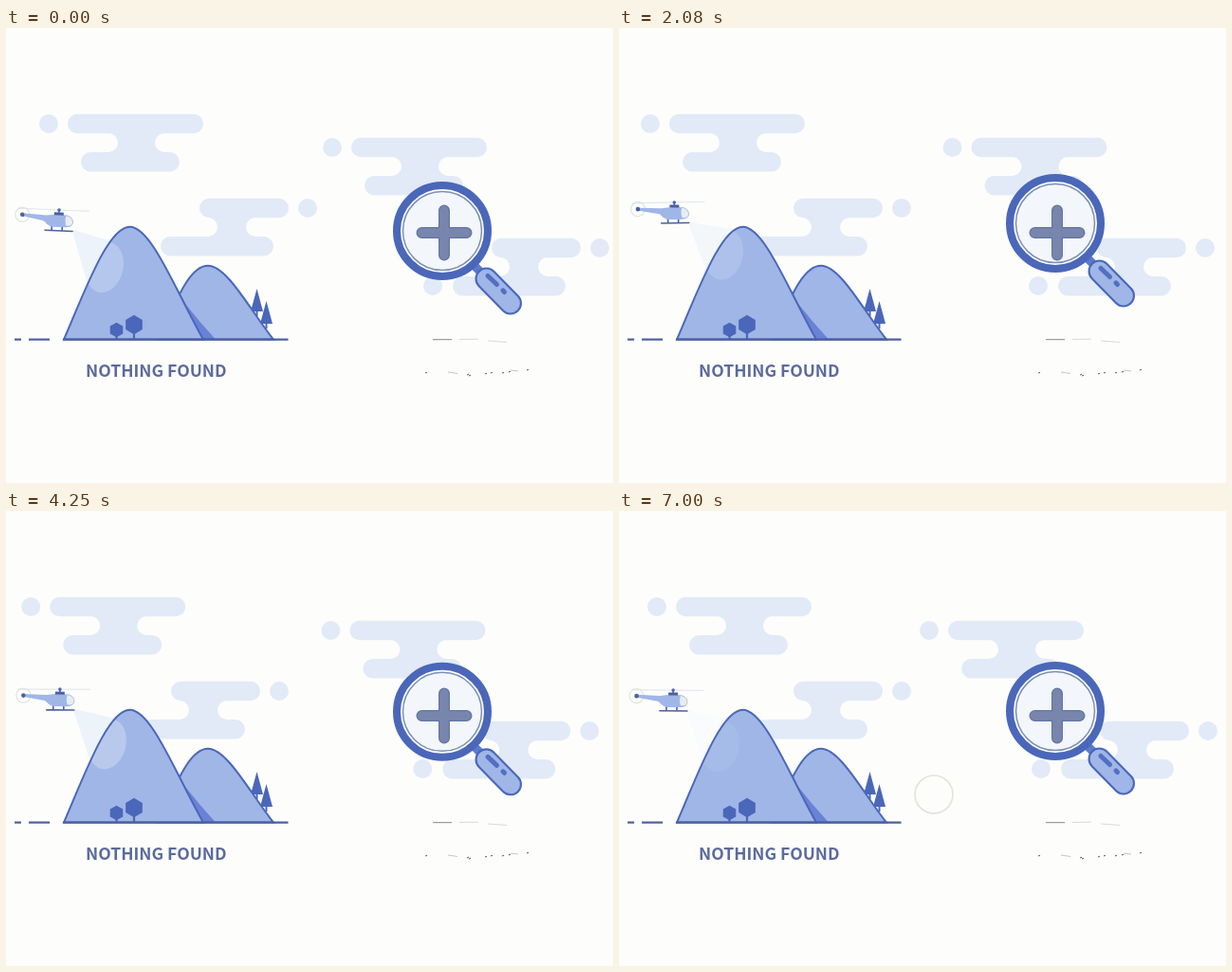
Recreate the animation shown at these times as an HTML page with a canvas. Size 640 by 480 pixels, loop 7080 ms.

```html
<!DOCTYPE html>
<html lang="en">
<head>
<meta charset="utf-8">
<title>Nothing found</title>
<style>
html, body { margin: 0; width: 640px; height: 480px; overflow: hidden; background: #fdfdfc; }
canvas { display: block; }
</style>
</head>
<body>
<canvas id="stage" width="640" height="480"></canvas>
<script>
const ctx = document.getElementById('stage').getContext('2d');
const LOOP = 7080, TAU = Math.PI * 2;
const BLUE = '#4a67b9', FILL = '#9fb6e7', MIST = '#e2eaf7', PAPER = '#fdfdfc', DARK = '#4c60a0';

// Smooth motion through a few poses, without overshoot
const KEYS = [0, 750, 2080, 3330, 5080, 5830, 7000];
function track(...v) {
  const n = KEYS.length;
  const slope = i => (v[i + 1] - v[i]) / (KEYS[i + 1] - KEYS[i]);
  const tangent = i => {
    if (i === 0 || i === n - 1) return 0.5 * slope(i ? n - 2 : 0);
    const a = slope(i - 1), b = slope(i);
    return a * b <= 0 ? 0 : 2 * a * b / (a + b);
  };
  return t => {
    let i = 0;
    while (i < n - 2 && t > KEYS[i + 1]) i++;
    const h = KEYS[i + 1] - KEYS[i], u = Math.min(1, (t - KEYS[i]) / h);
    const u2 = u * u, u3 = u2 * u;
    return v[i] * (2 * u3 - 3 * u2 + 1) + v[i + 1] * (3 * u2 - 2 * u3)
      + h * (tangent(i) * (u3 - 2 * u2 + u) + tangent(i + 1) * (u3 - u2));
  };
}

const move = {
  cloudA: track(45, 43.5, 33, 28, 25.5, 26, 40),
  cloudB: track(318, 314.5, 298, 290.5, 287, 288.5, 298),
  cloudC: track(344, 348, 351.5, 347, 337.5, 332, 327),
  cloudD: track(626, 623, 618, 616, 615, 616, 621),
  lensY: track(214, 209.5, 206, 214, 208.5, 205.5, 211),
  heliX: track(-1.5, 0, 1.5, 2, -2, -2, 0),
  heliY: track(3.5, 0, -4.5, -5, 4.5, 5.5, 0.5),
  tilt: track(2.5, 0, -1, -3, 3.5, 4.5, 0.5),
  spotX: track(104, 107, 111, 111, 103.5, 103.5, 107),
  spotY: track(252.5, 248, 239, 237.5, 254, 255, 248.5),
  glow: track(0.75, 0.25, 0.5, 0.85, 0.85, 0.85, 0.22)
};

function fill(color, path) { ctx.fillStyle = color; ctx.fill(path); }
function stroke(color, width, path, cap = 'butt') {
  ctx.strokeStyle = color;
  ctx.lineWidth = width;
  ctx.lineCap = cap;
  ctx.stroke(path);
}
function line(color, width, x1, y1, x2, y2, cap) {
  stroke(color, width, new Path2D(`M${x1} ${y1}L${x2} ${y2}`), cap);
}
function disc(x, y, r, ry = r, turn = 0) {
  const p = new Path2D();
  p.ellipse(x, y, r, ry, turn, 0, TAU);
  return p;
}

const BIG = new Path2D('M61 328.6C84 275 108 209.7 130.5 209.7C153 209.7 178 275 208 328.6Z');
const SMALL = new Path2D('M160 328.6C183 279 195 250.8 213 250.8C233 250.8 257 297 282 328.6Z');
const SHADE = new Path2D('M189 291Q204 310 221 328.6H208Z');

// Two rounded bars joined by a waisted neck; top and low are [left, right], neck holds the notch centres
function cloud(y, top, low, neck) {
  const p = new Path2D(), r = 10.2;
  const bar = (b, cy) => {
    p.arc(b[0] + r, cy, r, Math.PI / 2, Math.PI * 1.5);
    p.arc(b[1] - r, cy, r, -Math.PI / 2, Math.PI / 2);
    p.closePath();
  };
  bar(top, y);
  p.moveTo(low[0] + r, y + 50.4);
  bar(low, y + 40.2);
  p.moveTo(neck[0], y + 9.5);
  p.lineTo(neck[1], y + 9.5);
  p.arc(neck[1], y + 20, 10, -Math.PI / 2, Math.PI / 2, true);
  p.lineTo(neck[0], y + 30.5);
  p.arc(neck[0], y + 20, 10, Math.PI / 2, -Math.PI / 2, true);
  p.closePath();
  fill(MIST, p);
}
function leftCloud(x, y) {
  fill(MIST, disc(x, y, 10));
  cloud(y, [x + 20, x + 163], [x + 34, x + 138], [x + 63, x + 122]);
}
function rightCloud(x, y) {
  fill(MIST, disc(x, y, 10));
  cloud(y, [x - 114, x - 20], [x - 155, x - 36], [x - 105, x - 55]);
}

function hexTree(x, y, r) {
  const p = new Path2D();
  for (let i = 0; i < 6; i++) {
    const a = i * TAU / 6 - Math.PI / 2;
    p.lineTo(x + r * Math.cos(a), y + r * Math.sin(a));
  }
  p.closePath();
  fill(BLUE, p);
  line(BLUE, 2.2, x, y, x, 328.6);
}
function pine(x, y) {
  fill(BLUE, new Path2D(`M${x} ${y}l6.5 24h-13Z`));
  line(BLUE, 2, x, y + 20, x, y + 29);
}

function mountains(t) {
  const x = move.spotX(t), y = move.spotY(t), glow = move.glow(t);
  const lampX = 71 + move.heliX(t), lampY = 209 + move.heliY(t);
  ctx.globalAlpha = glow;
  fill('#e9f1fa', new Path2D(`M${lampX} ${lampY}L${x + 12} ${y - 26}L${x - 16} ${y + 25}Z`));
  ctx.globalAlpha = 1;

  pine(264.5, 275);
  pine(274.5, 288);
  fill(FILL, SMALL);
  fill('#6a82d6', SHADE);
  stroke(BLUE, 2, SMALL);
  fill(FILL, BIG);
  ctx.save();
  ctx.clip(BIG);
  ctx.globalAlpha = glow;
  fill('#bccdee', disc(x, y, 19.5, 27, 0.25));
  ctx.restore();
  stroke(BLUE, 2, BIG);
  hexTree(135, 313, 10.2);
  hexTree(116.5, 318.5, 7.8);
  line(DARK, 2.2, 60, 328.6, 297.5, 328.6);
  line(DARK, 2.2, 9, 328.6, 16, 328.6);
  line(DARK, 2.2, 24, 328.6, 46, 328.6);
}

function helicopter(t) {
  ctx.save();
  ctx.translate(57 + move.heliX(t), 200 + move.heliY(t));
  ctx.rotate(move.tilt(t) * Math.PI / 180);
  line('#e4e9ec', 1.3, -44, -11.5, 32, -11.5);
  stroke('#dfe3e0', 1.2, disc(-38.5, -5, 7.5));
  line(DARK, 1.6, -7, 4, -7, 10);
  line(DARK, 1.6, 4, 4, 4, 10);
  line(DARK, 1.6, -14, 10.3, 15, 10.3, 'round');
  fill(FILL, new Path2D('M-38 -6.5L-14 -5.5Q-8 -6.5 0 -6.5H5C12 -6.5 15 -3 15 1C15 5 11 6.5 6 6.5H-5C-11 6.5 -13 2.5 -16 .5L-38 -3.5Z'));
  fill('#e6edf5', new Path2D('M8 -6C13 -5 15 -2 15 1C15 4 12 6 8 5Q6 0 8 -6Z'));
  stroke('#a9b7c8', 0.8, new Path2D('M8 -6C13 -5 15 -2 15 1C15 4 12 6 8 5'));
  line(DARK, 3, -5, -7.5, 5, -7.5);
  line(DARK, 1.5, 0, -12, 0, -7.5);
  fill(BLUE, disc(0, -11.5, 1.8));
  fill(DARK, disc(-38.5, -5, 2.3));
  ctx.restore();
}

function magnifier(t) {
  ctx.save();
  ctx.translate(460, move.lensY(t));
  line('#5c7acb', 9, 31, 34, 40, 43);
  line(BLUE, 24, 46.5, 50.5, 72, 76.5, 'round');
  line(FILL, 19.8, 46.5, 50.5, 72, 76.5, 'round');
  line('#536fc0', 5, 48, 47.5, 57.5, 56.5, 'round');
  line('#536fc0', 5, 64, 63, 65.5, 64.5, 'round');
  fill(PAPER, disc(0, 0, 50));
  fill('#f3f6fa', disc(0, 0, 41.5));
  stroke(BLUE, 8, disc(0, 0, 48));
  stroke('#7b90b4', 1.5, disc(0, 0, 41.5));
  ctx.restore();
  const plus = new Path2D('M438.5 216H485.5M462 192.5V239.5');
  stroke('#6375a6', 12, plus, 'round');
  stroke('#7886ad', 9.5, plus, 'round');
}

function specks() {
  line('#85858d', 1, 450, 328.7, 470, 328.7);
  line('#d0d0d0', 0.8, 478, 328.5, 498, 328.2);
  line('#d0d0d0', 0.8, 508, 330, 528, 331.5);
  const marks = [442, 364, 486, 366, 488, 367, 505, 365, 511, 364, 523, 364, 530, 363, 549, 361];
  for (let i = 0; i < marks.length; i += 2) {
    line('#66666c', 1.1, marks[i], marks[i + 1], marks[i] + 2, marks[i + 1] - 0.7);
  }
  line('#b8b8b8', 0.8, 466, 363, 476, 364.5);
  line('#b8b8b8', 0.8, 532, 361, 540, 362);
}

function ring(t) {
  if (t < 5500) return;
  const u = Math.min(1, (t - 5500) / 250);
  stroke('#e3e3da', 1.6, disc(332, 299 + 170 * (1 - u) ** 2, 20));
}

function draw(t) {
  ctx.fillStyle = PAPER;
  ctx.fillRect(0, 0, 640, 480);
  leftCloud(move.cloudA(t), 101);
  rightCloud(move.cloudB(t), 190);
  leftCloud(move.cloudC(t), 126);
  rightCloud(move.cloudD(t), 232);
  fill(MIST, disc(move.cloudD(t) - 176, 272, 10));
  mountains(t);
  helicopter(t);
  magnifier(t);
  specks();
  ring(t);
  ctx.fillStyle = '#5c6a9c';
  ctx.font = 'bold 17.6px "Noto Sans CJK SC", "Noto Sans CJK JP", "Noto Sans", sans-serif';
  ctx.textAlign = 'center';
  ctx.fillText('NOTHING FOUND', 158.3, 368);
}

// The picture advances twelve times a second
const start = performance.now();
function tick() {
  const t = (performance.now() - start) % LOOP;
  draw(Math.floor((t + 5) * 0.012) / 0.012);
  requestAnimationFrame(tick);
}
tick();
</script>
</body>
</html>
```
